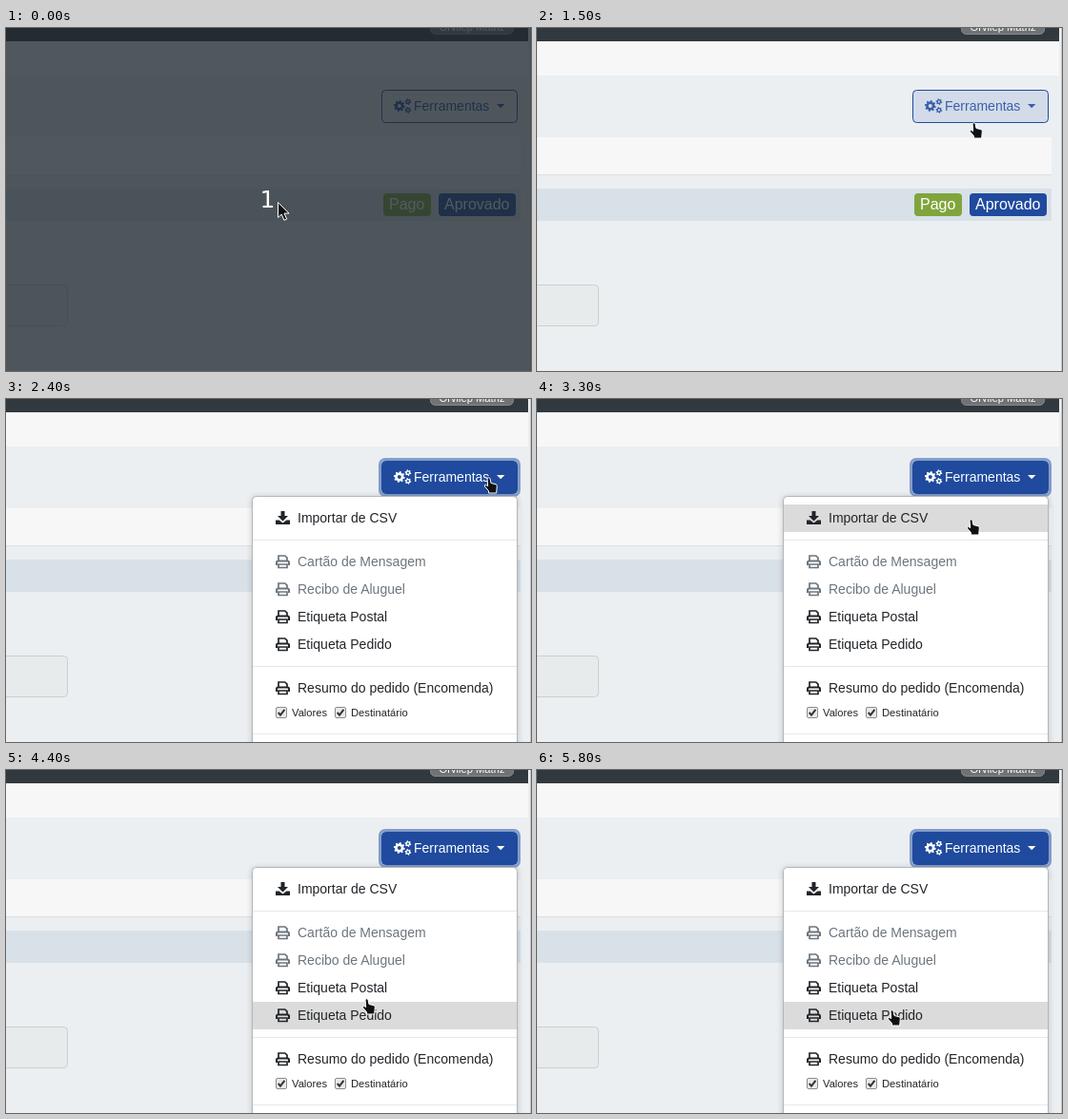
Recreate the animation shown at these times as an HTML page. Size 551 by 361 pixels, loop 8 s.

```html
<!DOCTYPE html>
<html lang="pt">
<head>
<meta charset="utf-8">
<style>
  html, body { margin: 0; width: 100%; height: 100%; overflow: hidden; background: #ebeff2; }
  svg { display: block; }
  text { font: 14px "Liberation Sans", Arial, sans-serif; }
  .badge { font-size: 16px; fill: #fff; }
  .small { font-size: 11.2px; }
</style>
</head>
<body>
<svg width="551" height="361" viewBox="0 0 551 361">
  <defs>
    <filter id="soft" x="-20%" y="-20%" width="140%" height="140%"><feGaussianBlur stdDeviation="3"/></filter>
    <g id="printer" stroke="currentColor" fill="none">
      <path d="M3 6V1h6.8L12 3.2V6M3 10h9v3.5H3z" stroke-width="1.7"/>
      <path d="M1 11V8q0-1.6 1.6-1.6h9.8Q14 6.4 14 8v3" stroke-width="2"/>
    </g>
    <g id="download" fill="currentColor">
      <path d="M5.5 0h4v5H13L7.500 10.500 2 5h3.500z"/>
      <path d="M0 9.500h3.700l3.800 3 3.800-3H15V14H0z"/>
    </g>
    <g id="checkbox">
      <rect x=".5" y=".5" width="11" height="11" rx="1.500" fill="#e9e9e9" stroke="#8b8b8b"/>
      <path d="M2.700 6l2.300 2.700L9.400 2.800" fill="none" stroke="#333" stroke-width="2"/>
    </g>
  </defs>

  <rect width="551" height="361" fill="#ebeff2"/>
  <rect y="14" width="548" height="36" fill="#f7f7f7"/>
  <rect width="548" height="14" fill="#32393e"/>
  <rect x="445.500" y="-12" width="87" height="18.500" rx="5" fill="#6f7376" stroke="#858a8d"/>
  <text x="489" y="3" text-anchor="middle" class="small" fill="#fff">Orvilep Matriz</text>
  <rect y="115" width="540" height="39" fill="#f7f7f7"/>
  <rect y="154" width="540" height="1" fill="#dcdfe1"/>
  <rect y="169" width="540" height="34" fill="#d9e1e8"/>
  <rect x="396" y="174" width="50" height="24" rx="4" fill="#80a53c"/>
  <text x="402" y="191" class="badge">Pago</text>
  <rect x="454" y="174" width="81" height="24" rx="4" fill="#1f4a9e"/>
  <text x="460" y="191" class="badge">Aprovado</text>
  <rect x="-10" y="270.500" width="74.500" height="43" rx="4" fill="#e7ebeb" stroke="#c9cfd1"/>
  <path d="M550.500 0V361" stroke="#c6c9cb"/>

  <rect id="ring" x="392.500" y="63.500" width="146" height="38" rx="5.500" fill="none" stroke="#1f4a9e" stroke-width="3"/>
  <rect id="button" x="394.500" y="65.500" width="142" height="34" rx="4" stroke="#1f4a9e"/>
  <g id="label">
    <path id="cogs" fill-rule="evenodd"/>
    <text x="428" y="87">Ferramentas</text>
    <path d="M515 80h8.400l-4.200 4.300z"/>
  </g>

  <g id="menu">
    <rect x="258" y="103" width="279" height="280" rx="4" fill="#000" opacity=".2" filter="url(#soft)"/>
    <rect x="258.500" y="102.500" width="278" height="280" rx="4" fill="#fff" stroke="#b3b6b9"/>
    <rect id="hover" x="259" width="277" height="29" fill="#dbdbdb"/>
    <path d="M259 148.500H536M259 281.500H536M259 352.500H536" stroke="#e5e8eb"/>
    <g id="items"></g>
    <use href="#checkbox" x="283" y="324"/>
    <text x="300" y="334" class="small" fill="#212529">Valores</text>
    <use href="#checkbox" x="345" y="324"/>
    <text x="362" y="334" class="small" fill="#212529">Destinatário</text>
  </g>

  <g id="countdown">
    <rect width="551" height="361" fill="#202930" opacity=".77"/>
    <text x="274.500" y="189" text-anchor="middle" fill="#fff" style="font:25px 'DejaVu Sans',sans-serif">1</text>
  </g>

  <g id="cursor" stroke="#fff" stroke-linejoin="round">
    <path id="arrow" d="M.5.5V16.500l3.700-3.400 2.700 6.200 2.800-1.200-2.700-6H12z" fill="#111"/>
    <path id="hand" d="M3 1.500q1.500-1.500 3 0l1 5 5 1.200q1.500.6 1.300 2l-.6 7.300h-8l-.3-2.500-4-4.500q-.6-1.800 1.300-1.600l2 1.200z" fill="#111"/>
  </g>
</svg>
<script>
const LOOP = 8000;
const $ = id => document.getElementById(id);

// Pointer path: time, x, y
const path = [
  [600, 285, 183], [900, 324, 167], [1300, 424, 117], [1500, 454, 99], [1600, 483, 89], [1700, 502, 82],
  [3000, 502, 82], [3200, 479, 105], [3300, 451, 126], [3600, 414, 167], [3900, 387, 212],
  [4200, 379, 229], [4400, 374, 240], [4500, 371, 255],
  [4600, 371, 255], [4900, 374, 239], [5300, 377, 226], [5500, 377, 226], [5800, 368, 252]
];

// Hovered menu row: start time, top of the row (0 = none)
const hovers = [[0, 0], [3300, 111], [3500, 0], [4000, 215], [4400, 244], [4900, 215], [5700, 244]];

const mix = (a, b, k) => a + (b - a) * k;
const blend = (a, b, k) => `rgb(${a.map((v, i) => Math.round(mix(v, b[i], k)))})`;
const BLUE = [31, 74, 158], PAGE = [235, 239, 242], WHITE = [255, 255, 255];

function gear(cx, cy, outer, inner, hole, teeth) {
  const points = [];
  for (let i = 0; i < teeth * 4; i++) {
    const angle = (i + .5) / (teeth * 4) * 2 * Math.PI;
    const r = i % 4 < 2 ? outer : inner;
    points.push(`${cx + r * Math.cos(angle)} ${cy + r * Math.sin(angle)}`);
  }
  return `M${points.join('L')}ZM${cx - hole} ${cy}a${hole} ${hole} 0 1 0 ${2 * hole} 0a${hole} ${hole} 0 1 0 ${-2 * hole} 0Z`;
}

$('cogs').setAttribute('d',
  gear(412.8, 82, 6, 4.5, 2, 8) + gear(421.9, 77.6, 3.4, 2.4, 1.1, 6) + gear(421.9, 86.4, 3.4, 2.4, 1.1, 6));

$('items').innerHTML = [
  ['Importar de CSV', 130, 'download'],
  ['Cartão de Mensagem', 176, 'printer', true],
  ['Recibo de Aluguel', 205, 'printer', true],
  ['Etiqueta Postal', 234, 'printer'],
  ['Etiqueta Pedido', 263, 'printer'],
  ['Resumo do pedido (Encomenda)', 309, 'printer']
].map(([name, y, icon, disabled]) => {
  const color = disabled ? '#6c757d' : '#212529';
  return `<g color="${color}"><use href="#${icon}" x="283" y="${y - 12}"/><text x="306" y="${y}" fill="${color}">${name}</text></g>`;
}).join('');

function pointerAt(t) {
  const next = path.findIndex(p => p[0] > t);
  if (next === 0) return path[0].slice(1);
  if (next < 0) return path[path.length - 1].slice(1);
  const a = path[next - 1], b = path[next], k = (t - a[0]) / (b[0] - a[0]);
  return [mix(a[1], b[1], k), mix(a[2], b[2], k)];
}

const show = (id, on) => $(id).setAttribute('display', on ? 'inline' : 'none');

function draw(time) {
  const t = Math.floor(time / 100) * 100;
  const fill = t < 1500 ? 0 : t < 1600 ? .12 : t < 1700 ? .88 : 1;
  $('button').setAttribute('fill', blend(PAGE, BLUE, fill));
  $('label').setAttribute('fill', blend(BLUE, WHITE, fill));
  $('ring').setAttribute('opacity', t < 2200 ? 0 : t < 2300 ? .2 : .5);

  show('countdown', t < 500);
  show('menu', t >= 2300);
  const top = hovers.filter(h => h[0] <= t).pop()[1];
  show('hover', top > 0);
  $('hover').setAttribute('y', top);

  const [x, y] = pointerAt(t);
  $('cursor').setAttribute('transform', `translate(${Math.round(x)} ${Math.round(y)})`);
  show('arrow', t < 1500);
  show('hand', t >= 1500);
}

const start = performance.now();
function tick() {
  draw((performance.now() - start) % LOOP);
  requestAnimationFrame(tick);
}
tick();
</script>
</body>
</html>
```
